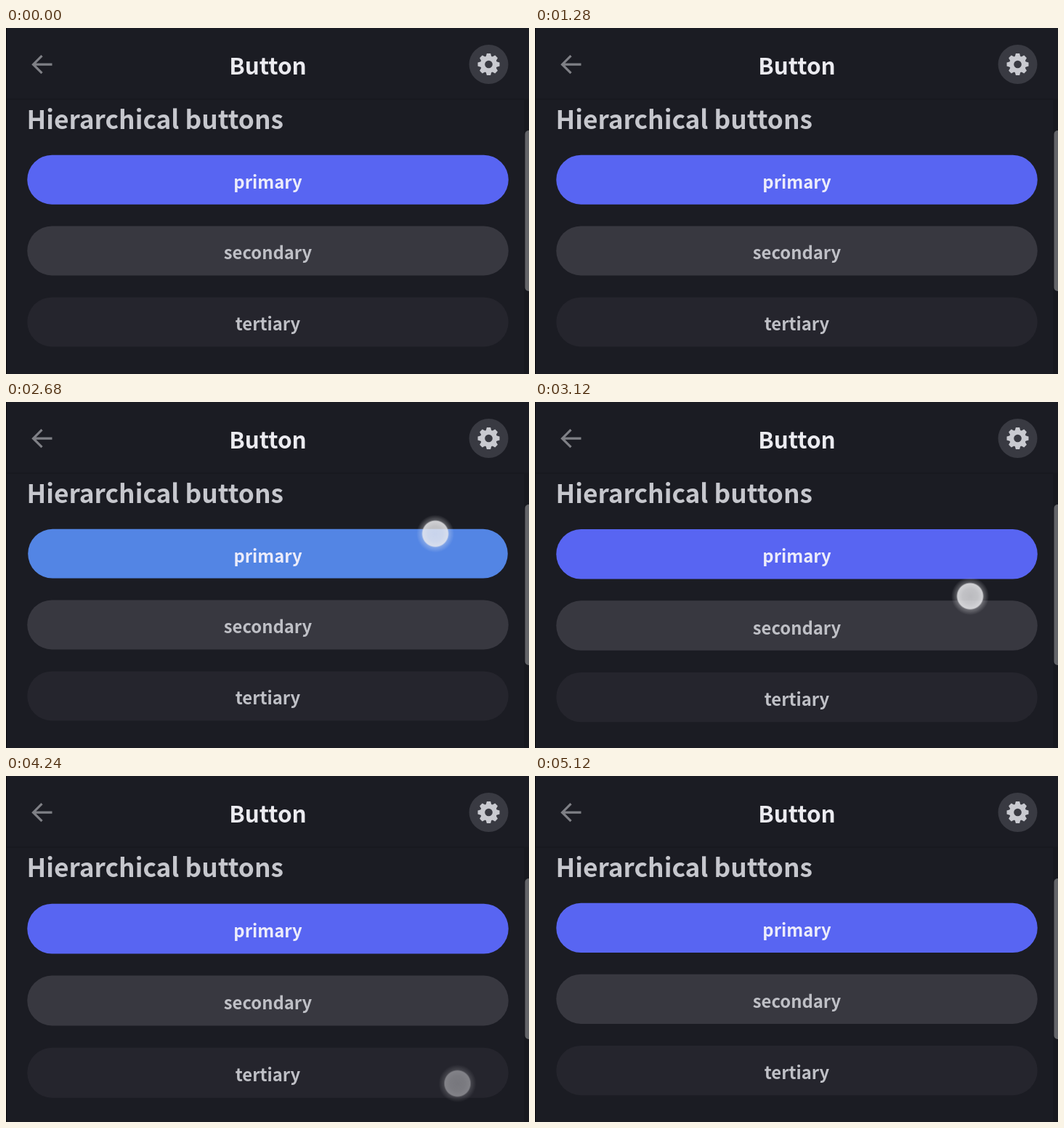
Recreate the animation shown at these times as an HTML page with a canvas. Size 720 by 476 pixels, loop 5.16 s.

```html
<!DOCTYPE html>
<html lang="en">
<head>
<meta charset="utf-8">
<title>Button</title>
<style>
html, body { margin: 0; width: 100%; height: 100%; overflow: hidden; background: #1b1c23; }
canvas { display: block; }
</style>
</head>
<body>
<canvas id="stage" width="720" height="476"></canvas>
<script>
const ctx = document.getElementById('stage').getContext('2d');
const LOOP = 5160;
const FONT = '"Noto Sans CJK JP", "Noto Sans CJK SC", "Noto Sans", sans-serif';
const BLUE = [88, 101, 242], GREEN = [46, 231, 129];
const PAGE_TOP = 98;
const GAMMA = 2.2;

const mix = (a, b, k) => a + (b - a) * k;

// Blends one colour channel in linear light.
const blend = (a, b, k) => Math.round(mix(a ** GAMMA, b ** GAMMA, k) ** (1 / GAMMA));

// Piecewise interpolation through [time, value] stops.
function track(stops, t, smooth = true) {
  if (t <= stops[0][0]) return stops[0][1];
  for (let i = 1; i < stops.length; i++) {
    const [t0, v0] = stops[i - 1], [t1, v1] = stops[i];
    if (t < t1) {
      const k = (t - t0) / (t1 - t0);
      return mix(v0, v1, smooth ? k * k * (3 - 2 * k) : k);
    }
  }
  return stops[stops.length - 1][1];
}

function text(str, x, y, size, color, align = 'center') {
  ctx.font = `600 ${size}px ${FONT}`;
  ctx.textAlign = align;
  ctx.fillStyle = color;
  ctx.fillText(str, x, y);
}

function roundRect(x, y, w, h, r, color) {
  ctx.fillStyle = color;
  ctx.beginPath();
  ctx.roundRect(x, y, w, h, r);
  ctx.fill();
}

function disc(x, y, r, color) {
  ctx.fillStyle = color;
  ctx.beginPath();
  ctx.arc(x, y, r, 0, Math.PI * 2);
  ctx.fill();
}

function button(label, y, color, ink, scale = 1) {
  const w = 662.5, h = 68;
  ctx.save();
  ctx.translate(360.5, y + h / 2);
  ctx.scale(scale, scale);
  roundRect(-w / 2, -h / 2, w, h, h / 2, color);
  text(label, 0, 12, 23.8, ink);
  ctx.restore();
}

function arrow() {
  ctx.strokeStyle = '#7f8086';
  ctx.lineWidth = 3.2;
  ctx.beginPath();
  ctx.moveTo(63.5, 50.2);
  ctx.lineTo(38, 50.2);
  ctx.moveTo(49.5, 38.2);
  ctx.lineTo(37.5, 50.2);
  ctx.lineTo(49.5, 62.2);
  ctx.stroke();
}

function gear() {
  const x = 664.5, y = 50, hub = '#393a42';
  disc(x, y, 27, hub);
  disc(x, y, 11.5, '#c9cad0');
  for (let i = 0; i < 8; i++) {
    ctx.save();
    ctx.translate(x, y);
    ctx.rotate(i * Math.PI / 4);
    ctx.beginPath();
    ctx.moveTo(-4, -10);
    ctx.lineTo(-2.6, -15);
    ctx.lineTo(2.6, -15);
    ctx.lineTo(4, -10);
    ctx.fill();
    ctx.restore();
  }
  disc(x, y, 5.3, hub);
}

function touch(t) {
  const alpha = track([[1380, 0], [1470, 1], [4170, 1], [4320, 0]], t);
  if (!alpha) return;
  const x = track([[2300, 589], [2680, 591], [3120, 599], [4240, 621.5]], t, false);
  const y = track([[2300, 214], [2640, 180], [2680, 181], [3120, 267], [4240, 423]], t, false);
  const glow = ctx.createRadialGradient(x, y, 0, x, y, 26);
  const pale = a => `rgba(235,235,238,${a})`;
  glow.addColorStop(0, pale(.77));
  glow.addColorStop(.4, pale(.8));
  glow.addColorStop(.66, pale(.87));
  glow.addColorStop(.73, pale(.28));
  glow.addColorStop(1, pale(0));
  ctx.globalAlpha = alpha;
  disc(x, y, 26, glow);
  ctx.globalAlpha = 1;
}

function content(t) {
  const tint = track([[1440, 0], [1740, 1], [2480, 1], [2750, 0]], t);
  const press = track([[1420, 0], [1660, 1], [2420, 1], [2760, 0]], t);
  const pull = track([[2700, 0], [3120, .0055], [4200, .0125]], t, false) *
    Math.exp(-Math.max(0, t - 4240) / 500);
  const fill = BLUE.map((c, i) => blend(c, GREEN[i], tint));

  ctx.save();
  // Overscroll stretches the page away from the header.
  ctx.translate(0, PAGE_TOP);
  ctx.scale(1, 1 + pull);
  ctx.translate(0, -PAGE_TOP);
  text('Hierarchical buttons', 28.6, 138.5, 35.25, '#c6c7cd', 'left');
  button('primary', 174.7, `rgb(${fill})`, '#ececfa', 1 - .021 * press);
  button('secondary', 272.4, '#383840', '#bfc0c6');
  button('tertiary', 370.4, '#25252d', '#bfc0c6');
  ctx.restore();
}

function draw(now) {
  const t = now % LOOP;
  ctx.fillStyle = '#1b1c23';
  ctx.fillRect(0, 0, 720, 476);
  ctx.fillStyle = '#18191f';
  ctx.fillRect(0, 97, 720, 2);
  ctx.fillRect(713, 99, 7, 377);
  content(t);
  arrow();
  text('Button', 360.5, 63.5, 31.5, '#ebebf0');
  gear();
  roundRect(714.5, 141, 12, 221, 5, '#646569');
  ctx.fillStyle = '#08080a';
  ctx.fillRect(0, 0, 1, 476);
  touch(t);
  requestAnimationFrame(tick);
}

const start = performance.now();
const tick = () => draw(performance.now() - start);
tick();
</script>
</body>
</html>
```
